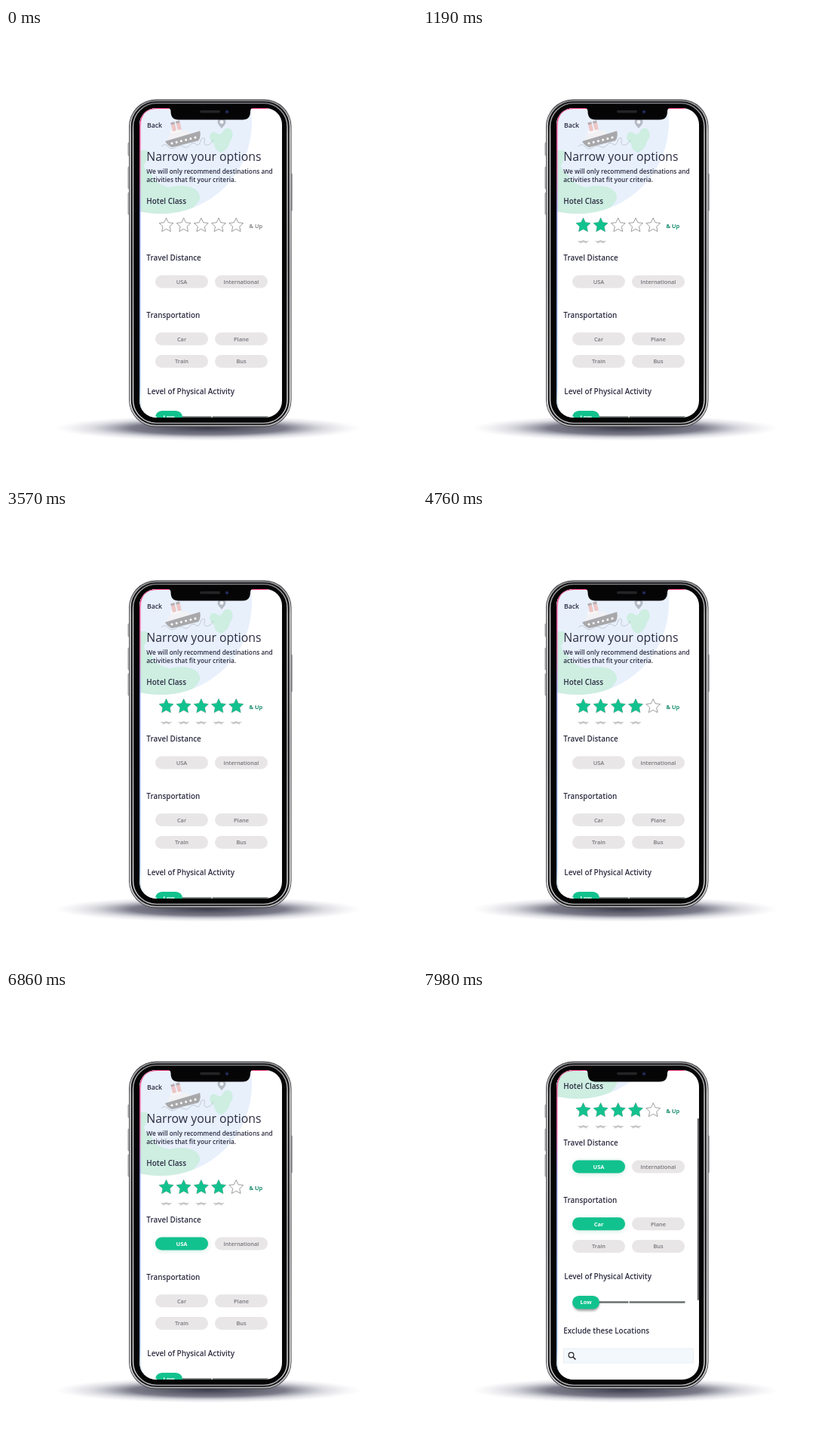
Write an HTML page that moves like this. It is 545x600 px and loops after 8 s.

```html
<!DOCTYPE html>
<html lang="en">
<head>
<meta charset="utf-8">
<title>Narrow your options</title>
<style>
  html, body { margin: 0; width: 100%; height: 100%; overflow: hidden; background: #fff; }
  svg { display: block; width: 545px; height: 600px; }
  text { font-family: "Open Sans", "Noto Sans", sans-serif; fill: #2b2b40; }
  .title { font-size: 15.8px; font-weight: 500; }
  .lead { font-size: 8.3px; font-weight: 600; }
  .head { font-size: 9.9px; font-weight: 600; }
  .back { font-size: 8.7px; font-weight: 600; }
  .label { font-size: 7.4px; font-weight: 600; fill: #747478; }
  .mid { text-anchor: middle; }
  .white { fill: #fff; font-weight: 700; }
  .green { fill: #12a078; }
</style>
</head>
<body>
<svg viewBox="0 0 545 600">
  <defs>
    <radialGradient id="floor">
      <stop offset="0" stop-color="#3c3c4c"/>
      <stop offset=".5" stop-color="#5a5a6c" stop-opacity=".8"/>
      <stop offset=".75" stop-color="#9696a8" stop-opacity=".35"/>
      <stop offset="1" stop-color="#c8c8d4" stop-opacity="0"/>
    </radialGradient>
    <linearGradient id="metal" x2="0" y2="1">
      <stop offset="0" stop-color="#8c8c8f"/>
      <stop offset=".1" stop-color="#dededf"/>
      <stop offset=".5" stop-color="#c6c6c8"/>
      <stop offset=".92" stop-color="#e4e4e5"/>
      <stop offset="1" stop-color="#b4b4b7"/>
    </linearGradient>
    <linearGradient id="fringe" gradientUnits="userSpaceOnUse" x1="0" y1="106" x2="0" y2="516">
      <stop offset="0" stop-color="#f0307c"/>
      <stop offset=".2" stop-color="#e0509c"/>
      <stop offset=".35" stop-color="#7c8ce8"/>
      <stop offset=".9" stop-color="#8ab4f0"/>
      <stop offset="1" stop-color="#fff"/>
    </linearGradient>
    <filter id="glow" x="-30%" y="-80%" width="160%" height="260%"><feGaussianBlur stdDeviation="3"/></filter>
    <filter id="soft" x="-30%" y="-80%" width="160%" height="260%"><feGaussianBlur stdDeviation="1.5"/></filter>
    <clipPath id="screen"><rect x="177" y="106" width="189" height="410" rx="22"/></clipPath>
    <clipPath id="globe"><circle cx="205" cy="125" r="121"/></clipPath>
  </defs>

  <ellipse cx="268" cy="530" rx="204" ry="17" fill="url(#floor)"/>

  <!-- phone body -->
  <g fill="#c4c4c6" stroke="#707074" stroke-width=".5">
    <rect x="161.8" y="152" width="2.500" height="17" rx="1"/>
    <rect x="161.8" y="184" width="2.500" height="29" rx="1"/>
    <rect x="161.8" y="218" width="2.500" height="29" rx="1"/>
    <rect x="377" y="193" width="2.500" height="49" rx="1"/>
  </g>
  <rect x="163" y="94.500" width="215.500" height="434" rx="36" fill="#3c3c3f"/>
  <rect x="164.800" y="96.300" width="211.900" height="430.400" rx="34.200" fill="#141416" stroke="url(#metal)" stroke-width="1.800"/>
  <rect x="168.500" y="99.600" width="204.500" height="423.800" rx="31" fill="#050506" stroke="url(#metal)" stroke-width="1.400"/>
  <rect x="177" y="106" width="189" height="410" rx="22" fill="#fff"/>

  <g clip-path="url(#screen)">
    <g id="page"></g>
    <rect id="scrollbar" x="363.8" y="170" width="2.2" height="241" rx="1" fill="#6b6b6f"/>
    <path d="M348 106.400H200Q177.8 106.500 177.8 131V491Q177.8 515.500 200 515.500" fill="none" stroke="url(#fringe)" stroke-width="1.300"/>
  </g>

  <path d="M214 105.500q4.500 .5 4.500 5q0 11 10 11H314q10 0 10-11q0-4.500 4.500-5z" fill="#050506"/>
  <rect x="257" y="109" width="27" height="3.600" rx="1.800" fill="#242427"/>
  <circle cx="293" cy="111" r="2.700" fill="#15182c"/>
  <circle cx="293" cy="111" r="1.100" fill="#30448c"/>
</svg>

<script>
const GREEN = '#12c28e';
const LOOP = 8000;
const page = document.getElementById('page');
const scrollbar = document.getElementById('scrollbar');
const STAR_X = [212.5, 235.6, 258.8, 282, 305.2];

const text = (x, y, cls, words) => `<text x="${x}" y="${y}" class="${cls}">${words}</text>`;

const starPoints = (cx, cy, radius) => Array.from({ length: 10 }, (_, i) => {
  const r = i % 2 ? radius * .48 : radius;
  const a = i * Math.PI / 5 - Math.PI / 2;
  return `${(cx + r * Math.cos(a)).toFixed(2)},${(cy + r * Math.sin(a)).toFixed(2)}`;
}).join(' ');

const star = (x, i) => `
  <polygon points="${starPoints(x, 261.5, 9.9)}" fill="#fff" stroke="#85858a" stroke-width=".8" stroke-linejoin="round"/>
  <g id="star${i}">
    <polygon points="${starPoints(x, 261.5, 10.3)}" fill="${GREEN}"/>
    <path transform="translate(${x} 281)" d="M-8 1H-3L0 0L3 1H8L4.500 3L5 4.500L0 2.800L-5 4.500L-4.500 3Z" fill="#c9c9cc"/>
  </g>`;

const pill = (x, y, fill, extra = '') =>
  `<rect x="${x}" y="${y - 8.5}" width="70" height="17" rx="8.500" fill="${fill}" ${extra}/>`;

const option = (x, y, words, id) => pill(x, y, '#e9e6e8') + text(x + 35, y + 2.7, 'label mid', words) +
  (id ? `<g id="${id}">${pill(x, y + 1, '#9fd9c6', 'filter="url(#glow)" opacity=".55"')}
    ${pill(x, y, GREEN)}${text(x + 35, y + 2.7, 'label mid white', words)}</g>` : '');

const portholes = Array.from({ length: 6 }, (_, i) =>
  `<circle cx="${-16 + i * 6.4}" cy="2" r="1.500" fill="#fff"/>`).join('');

const header = `
  <circle cx="205" cy="125" r="121" fill="#e8f0fc"/>
  <g clip-path="url(#globe)" fill="#cdeee1">
    <path d="M170 162H187Q190 172 183 181Q184 190 192 193Q198 207 216 211Q232 207 246 211Q258 216 257 226Q252 240 226 250H170Z"/>
    <path d="M270 144Q272 135 279 139Q284 143 287 138Q291 130 298 134Q304 142 297 150Q295 161 285 165Q276 162 276 153Q270 150 270 144Z"/>
  </g>
  <path d="M206 157q4-5 9 0t10 1t10-1t9-2t8-1t7-7q6-4 4 3q-1 6 5 5q4-1 7-7" fill="none" stroke="#b9c1cc" stroke-width=".8"/>
  <g transform="translate(235 147) rotate(-14)">
    <path d="M-17-10H8L11-4H-20Z" fill="#f2f1f3"/>
    <path d="M-14-15H0V-10H-14Z" fill="#f8f6f7"/>
    <path d="M-11-25H-6V-13H-11ZM-4-25H1V-13H-4Z" fill="#edc5c4"/>
    <path d="M-11-25H-6V-22H-11ZM-4-25H1V-22H-4Z" fill="#b3b0b5"/>
    <path d="M-24-3L24-5Q24 3 19 7H-17Q-22 4-24-3Z" fill="#a8a7aa"/>
    ${portholes}
  </g>
  <path d="M286 133Q280.500 127 280.500 124.500a5.500 5.500 0 0 1 11 0Q291.500 127 286 133Z" fill="#b4bac4"/>
  <circle cx="286" cy="124.500" r="2.400" fill="#f2f6fc"/>
  ${text(187, 131.5, 'back', 'Back')}
  ${text(186.3, 176, 'title', 'Narrow your options')}
  ${text(186.3, 193, 'lead', 'We will only recommend destinations and')}
  ${text(186.3, 203.5, 'lead', 'activities that fit your criteria.')}`;

const slider = `
  <path d="M232 515.500H347.500" stroke="#69716f" stroke-width="2.600"/>
  <path d="M273 513V518" stroke="#fff" stroke-width="1.200"/>
  <rect x="199" y="509" width="35" height="18" rx="9" fill="#555" opacity=".55" filter="url(#soft)"/>
  <rect x="198" y="507" width="36" height="17.500" rx="8.700" fill="${GREEN}"/>
  ${text(216, 518.3, 'label mid white', 'Low')}`;

const search = `
  <rect x="186.500" y="577" width="172" height="19" fill="#f3f8fd" stroke="#e5ecf1" stroke-width=".8"/>
  <path d="M199 588L202.500 591.500" stroke="#222" stroke-width="1.500"/>
  <circle cx="196.500" cy="585.500" r="3.400" fill="none" stroke="#222" stroke-width="1.200"/>`;

page.innerHTML = header +
  text(186.3, 232.5, 'head', 'Hotel Class') + STAR_X.map(star).join('') +
  text(322.5, 265, 'label', '&amp; Up') + `<g id="up">${text(322.5, 265, 'label green', '&amp; Up')}</g>` +
  text(186.3, 308, 'head', 'Travel Distance') +
  option(198, 336, 'USA', 'usa') + option(277, 336, 'International') +
  text(186.3, 384, 'head', 'Transportation') +
  option(198, 411.8, 'Car', 'car') + option(277, 411.8, 'Plane') +
  option(198, 441.5, 'Train') + option(277, 441.5, 'Bus') +
  text(187.3, 485, 'head', 'Level of Physical Activity') + slider +
  text(186.3, 556.5, 'head', 'Exclude these Locations') + search;

const clamp = v => Math.min(1, Math.max(0, v));
const fade = (t, start, length = 140) => clamp((t - start) / length);
const smooth = v => v * v * (3 - 2 * v);
const show = (id, amount) => document.getElementById(id).setAttribute('opacity', amount);

const STAR_TIMES = [490, 980, 1750, 2660, 3150];
const LAST_STAR_OFF = 4200;

function draw(t) {
  const scroll = smooth(fade(t, 7350, 620));
  STAR_TIMES.forEach((start, i) => show('star' + i, fade(t, start) - (i === 4 ? fade(t, LAST_STAR_OFF) : 0)));
  show('up', fade(t, STAR_TIMES[0]));
  show('usa', fade(t, 5700));
  show('car', fade(t, 7000));
  page.setAttribute('transform', `translate(0 ${-102 * scroll})`);
  scrollbar.setAttribute('opacity', fade(t, 7350));
  scrollbar.setAttribute('y', 112 + 58 * scroll);
}

const began = performance.now();
function tick() {
  draw((performance.now() - began) % LOOP);
  requestAnimationFrame(tick);
}
tick();
</script>
</body>
</html>
```
